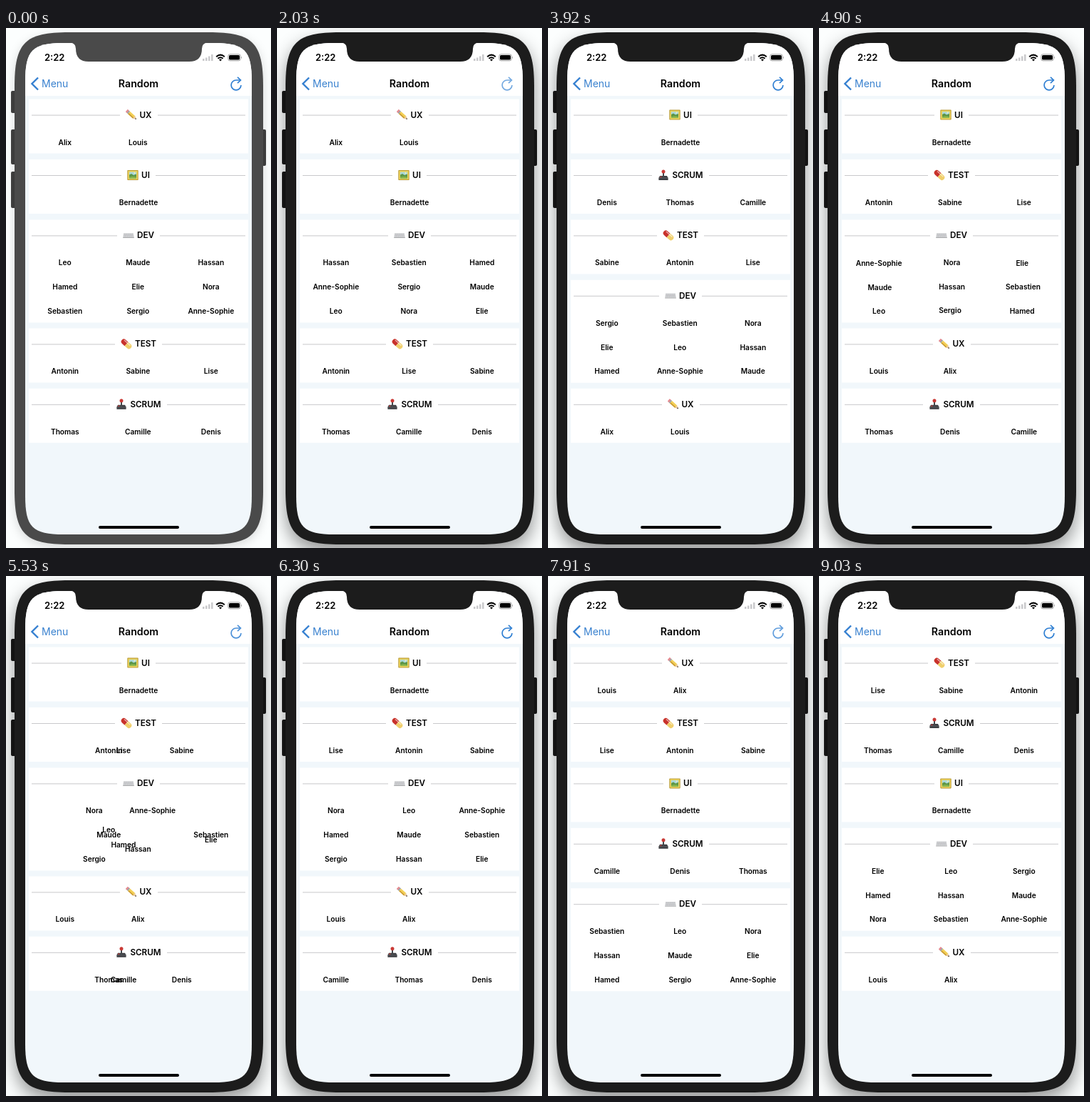
Recreate the animation shown at these times as an HTML page. Size 372 by 728 pixels, loop 9100 ms.

```html
<!DOCTYPE html>
<html lang="en">
<head>
<meta charset="utf-8">
<title>Random</title>
<style>
  html, body { margin: 0; width: 100%; height: 100%; overflow: hidden; background: #fff; }
  #stage { position: relative; width: 372px; height: 728px; overflow: hidden; background: #fcfefe;
    font-family: Inter, "Open Sans", sans-serif; color: #000; --body: #4a4a4a; --button: #414141; }
  #stage.focused { --body: #1c1c1c; --button: #181818; }
  #device { position: absolute; inset: 0; }
  #shell { fill: var(--body); filter: drop-shadow(0 4px 7px rgba(0, 0, 0, .15)); }
  .focused #shell { filter: drop-shadow(0 11px 12px rgba(0, 0, 0, .42)); }
  .buttons { fill: var(--button); }
  .notch { fill: var(--body); }
  .card { position: absolute; left: 32px; top: 0; width: 308px; background: #fff; }
  .head { position: absolute; left: 4px; right: 4px; top: 12px; height: 20px;
    display: flex; align-items: center; font-size: 11.7px; font-weight: 600; }
  .head::before, .head::after { content: ""; flex: 1; height: 1px; background: #c9c9cb; }
  .head svg { width: 16px; height: 16px; margin: 0 4px 0 8px; }
  .head span { margin-right: 8px; }
  .name { position: absolute; left: 0; top: 0; font-size: 10.2px; line-height: 14px;
    font-weight: 600; white-space: nowrap; }
</style>
</head>
<body>
<div id="stage">
  <svg id="device" width="372" height="728" viewBox="0 0 372 728">
    <defs><clipPath id="glass"><path id="glassShape"/></clipPath></defs>
    <g class="buttons">
      <rect x="7" y="88" width="8" height="31" rx="2"/>
      <rect x="7" y="142" width="8" height="49" rx="2"/>
      <rect x="7" y="201" width="8" height="51" rx="2"/>
      <rect x="357" y="142" width="8" height="51" rx="2"/>
    </g>
    <path id="shell"/>
    <g clip-path="url(#glass)">
      <path d="M27 21H345V709H27z" fill="#f1f7fb"/>
      <path d="M27 21H345V95H27z" fill="#fff"/>
    </g>
    <path class="notch" d="M90 20.5Q98 21 98 29Q98 47 116 47H257Q275 47 275 29Q275 21 283 20.5Z"/>
    <g font-weight="600">
      <text x="54" y="46" font-size="13">2:22</text>
      <text x="186" y="83" font-size="14.2" text-anchor="middle">Random</text>
    </g>
    <path d="M276 43h2.5v3h-2.5zM280 41.5h2.5v4.5h-2.5zM284 39.5h2.5v6.5h-2.5zM288 37h2.5v9h-2.5z" fill="#c9c9cc"/>
    <path d="M295.2 40.3Q301 35 306.8 40.3M297.4 42.8Q301 39.6 304.6 42.8" fill="none" stroke="#000" stroke-width="2"/>
    <path d="M299 44.3Q301 42.8 303 44.3L301 46.4Z"/>
    <rect x="311.8" y="36.8" width="17.4" height="9" rx="2.6" fill="none" stroke="#888" stroke-width=".8"/>
    <rect x="313" y="38" width="15" height="6.6" rx="1.6"/>
    <path d="M330.3 39.7q1.5 1.6 0 3.2z" fill="#888"/>
    <path d="M45 69.5L36.4 78L45 86.5" fill="none" stroke="#347fd0" stroke-width="2.4"/>
    <text x="50" y="83" font-size="14" fill="#3a82cf">Menu</text>
    <g id="refresh" fill="none" stroke="#2f7fd2" stroke-width="1.7">
      <path d="M329 73H323A6.9 6.9 0 1 0 329.9 79.9"/>
      <path d="M325 68.8L329.4 73L325 77.2"/>
    </g>
    <rect x="130" y="697" width="113" height="4" rx="2"/>
  </svg>
</div>
<script>
const LOOP = 9100, STEP = 70, GLIDE = 300, FOCUS_AT = 1120;
const COLUMNS = [50.8, 153.3, 255.8], ROW = 33.8;
const stage = document.getElementById('stage');
const refresh = document.getElementById('refresh');

// Rectangle whose corners ease into the sides instead of being plain arcs.
function smoothRect(left, top, right, bottom, radius) {
  const reach = 1.5 * radius, bend = 0.28 * radius;
  const corner = (x, y, sx, sy, flip) => {
    const points = [[0, reach], [0, bend], [bend, 0], [reach, 0]];
    if (flip) points.reverse();
    const [a, b, c, d] = points.map(([dx, dy]) => `${x + sx * dx} ${y + sy * dy}`);
    return `${a}C${b} ${c} ${d}`;
  };
  return 'M' + [
    corner(left, top, 1, 1, false), corner(right, top, -1, 1, true),
    corner(right, bottom, -1, -1, false), corner(left, bottom, 1, -1, true)
  ].join('L') + 'Z';
}
document.getElementById('shell').setAttribute('d', smoothRect(12, 6, 361, 723, 51));
document.getElementById('glassShape').setAttribute('d', smoothRect(27, 21, 345, 709, 36));

const groups = {
  X: {
    title: 'UX', names: ['Alix', 'Louis'],
    icon: `<g transform="rotate(42 8 8)"><path d="M-1 5.7h3v4.6h-3z" fill="#e58b91"/>
      <path d="M1.5 5.7h2v4.6h-2z" fill="#9ba4a8"/><path d="M3.5 5.7H13v4.6H3.5z" fill="#f3cf55"/>
      <path d="M3.5 8.7H13v1.6H3.5z" fill="#c99a35"/><path d="M13 5.7L17.5 8L13 10.3z" fill="#e9c79b"/>
      <path d="M15.5 7L17.5 8L15.5 9z" fill="#333"/></g>`
  },
  I: {
    title: 'UI', names: ['Bernadette'],
    icon: `<rect x=".3" y="1" width="15.4" height="14" rx=".8" fill="#b99a35"/>
      <rect x="1.3" y="2" width="13.4" height="12" fill="#ead25c"/>
      <path d="M3 3.6h10v8.8H3z" fill="#a9d8dc"/><path d="M3 7.5L6 6L9 8L13 6.4v6H3z" fill="#5d9648"/>
      <path d="M3 10.8Q8 9 13 11v1.4H3z" fill="#8ab84c"/><circle cx="10.5" cy="5" r="1" fill="#fff3b0"/>`
  },
  D: {
    title: 'DEV',
    names: ['Leo', 'Maude', 'Hassan', 'Hamed', 'Elie', 'Nora', 'Sebastien', 'Sergio', 'Anne-Sophie'],
    icon: `<path d="M1 4.8H15L15.8 10.6H.2z" fill="#d6d7d9"/><path d="M.2 10.6h15.6v1H.2z" fill="#a7a8aa"/>
      <path d="M1.6 6.2H14.4M1.4 7.8H14.6M1.2 9.4H14.8" stroke="#b0b2b5" stroke-width=".8" stroke-dasharray="1.2 .4"/>`
  },
  T: {
    title: 'TEST', names: ['Antonin', 'Sabine', 'Lise'],
    icon: `<g transform="rotate(42 8 8)"><path d="M8 4.3H3.2a3.7 3.7 0 0 0 0 7.4H8z" fill="#c8322b"/>
      <path d="M8 4.3h4.8a3.7 3.7 0 0 1 0 7.4H8z" fill="#f0cf6c"/>
      <path d="M2.5 6H13" stroke="#fff" stroke-opacity=".6" stroke-width="1.3" stroke-linecap="round"/></g>`
  },
  S: {
    title: 'SCRUM', names: ['Thomas', 'Camille', 'Denis'],
    icon: `<path d="M3 9H13L14.6 12V15H1.4V12z" fill="#3c3e42"/><path d="M1.4 12H14.6" stroke="#6b6e73" stroke-width=".7"/>
      <path d="M8 4V11" stroke="#44474b" stroke-width="2"/><circle cx="8" cy="3" r="2.5" fill="#c93a36"/>
      <ellipse cx="4.3" cy="10.5" rx="1.4" ry=".7" fill="#c93a36"/>`
  }
};

// Digits list each group's members in reading order.
const round = (at, order, D, X, T, S, tap = true) => ({ at, order, tap, seats: { D, X, T, S, I: '0' } });
const rounds = [
  round(-1000, 'XIDTS', '012345678', '01', '012', '012'),
  round(1470, 'XIDTS', '263871054', '01', '021', '012'),
  round(2070, 'DXSIT', '547168203', '10', '210', '012'),
  round(2727, 'DXSIT', '765402381', '01', '102', '201'),
  round(3080, 'ISTDX', '765402381', '01', '102', '201', false),
  round(4620, 'ITDXS', '854126073', '10', '012', '021'),
  round(5360, 'ITDXS', '508316724', '10', '201', '102'),
  round(6580, 'XTISD', '605214378', '10', '201', '120'),
  round(7980, 'TSIDX', '407321568', '10', '210', '012')
];

for (const group of Object.values(groups)) {
  const rows = Math.ceil(group.names.length / 3);
  group.pitch = 50.6 + rows * ROW;
  group.card = document.createElement('div');
  group.card.className = 'card';
  group.card.style.height = group.pitch - 8 + 'px';
  group.card.innerHTML =
    `<div class="head"><svg viewBox="0 0 16 16">${group.icon}</svg><span>${group.title}</span></div>` +
    group.names.map(name => `<div class="name">${name}</div>`).join('');
  group.labels = [...group.card.querySelectorAll('.name')];
  stage.append(group.card);
}

const clamp = v => Math.min(1, Math.max(0, v));
const ease = v => v * v * (3 - 2 * v);
const mix = (a, b, p) => a + (b - a) * p;

function seat(group, seats, member) {
  if (group.names.length === 1) return [154, 60];
  const slot = seats.indexOf(member);
  return [COLUMNS[slot % 3], 60 + Math.floor(slot / 3) * ROW];
}

function pressOpacity(t) {
  return Math.min(...rounds.filter(r => r.tap).map(({ at }) => {
    const d = t - at;
    return 1 - 0.45 * clamp(d < 0 ? 1 + d / 150 : 1 - d / 250);
  }));
}

function draw(t) {
  const index = rounds.findLastIndex(r => r.at <= t);
  const now = rounds[index], before = rounds[Math.max(0, index - 1)];
  const p = ease(clamp((t - now.at) / GLIDE));
  let top = 99.6;
  for (const key of now.order) {
    const group = groups[key];
    group.card.style.transform = `translateY(${top}px)`;
    top += group.pitch;
    group.labels.forEach((label, member) => {
      const [x0, y0] = seat(group, before.seats[key], String(member));
      const [x1, y1] = seat(group, now.seats[key], String(member));
      label.style.transform =
        `translate(${mix(x0, x1, p)}px, ${mix(y0, y1, p)}px) translate(-50%, -50%)`;
    });
  }
  stage.classList.toggle('focused', t >= FOCUS_AT);
  refresh.style.opacity = pressOpacity(t);
}

const start = performance.now();
function tick() {
  const t = (performance.now() - start) % LOOP;
  draw(Math.floor(t / STEP) * STEP);
  requestAnimationFrame(tick);
}
tick();
</script>
</body>
</html>
```
